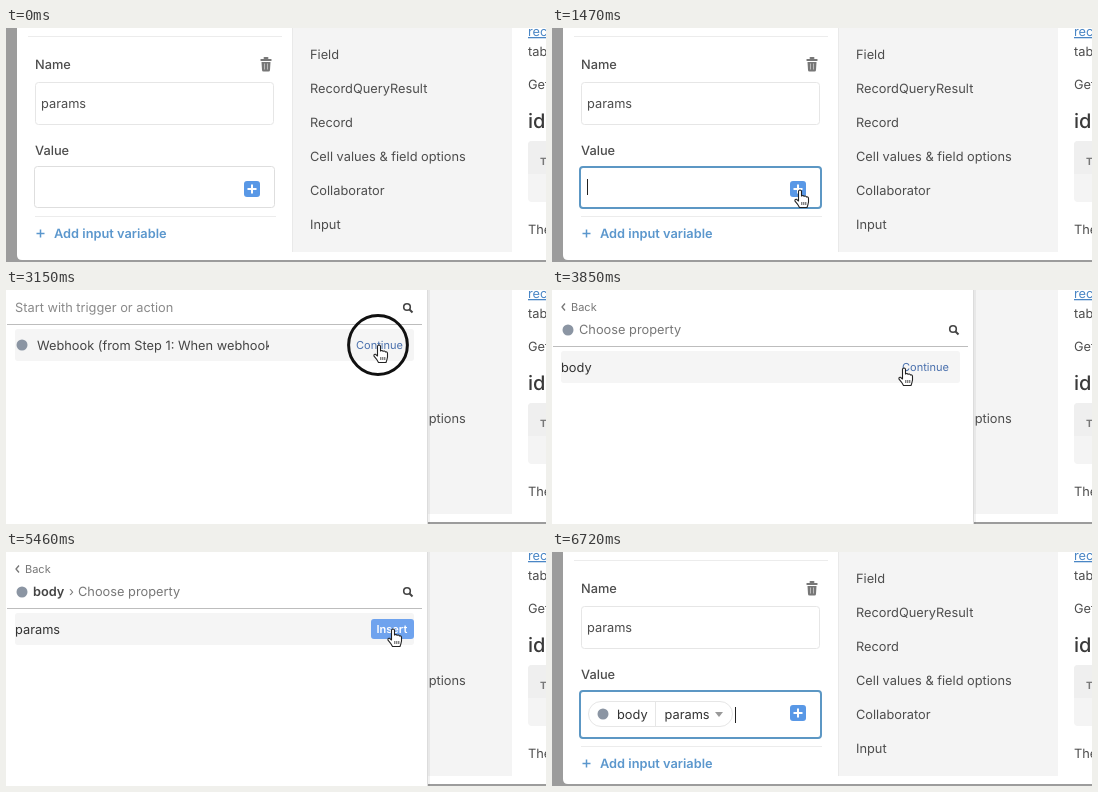
Recreate the animation shown at these times as an HTML page. Size 540 by 234 pixels, loop 6.86 s.

```html
<!DOCTYPE html>
<html lang="en">
<head>
<meta charset="utf-8">
<title>Insert a webhook value</title>
<style>
html, body { margin: 0; width: 100%; height: 100%; overflow: hidden; background: #fff; }
svg { display: block; width: 540px; height: 234px; font: 12.8px Inter, "Open Sans", sans-serif; }
svg svg { width: auto; height: auto; }
text { white-space: pre; text-rendering: geometricPrecision; }
</style>
</head>
<body>
<svg id="stage" viewBox="0 0 540 234"></svg>
<script>
const LOOP = 6860, STEP = 70;
const stage = document.getElementById('stage');

const rect = (x, y, w, h, fill, more = '') =>
  `<rect x="${x}" y="${y}" width="${w}" height="${h}" fill="${fill}" ${more}/>`;
const text = (x, y, s, fill = '#4d4d4d', more = '') =>
  `<text x="${x}" y="${y}" fill="${fill}" ${more}>${s}</text>`;
const path = (d, stroke, width = 1, fill = 'none') =>
  `<path d="${d}" stroke="${stroke}" stroke-width="${width}" fill="${fill}" stroke-linejoin="round"/>`;
const caret = (x, y) => rect(x, y, 1, 16, '#222');
const icon = (x, y) => `<circle cx="${x}" cy="${y}" r="5.5" fill="#8b95a3"/>`;
const MEDIUM = 'font-weight="500"', SEMI = 'font-weight="600"', SMALL = 'font-size="11"';
const between = (t, a, b) => t >= a && t < b;

// Dialog with the documentation column on the right
const menu = ['Field', 'RecordQueryResult', 'Record', 'Cell values &amp; field options', 'Collaborator', 'Input'];
const page = rect(0, 0, 540, 234, '#9c9c9c') +
  path('M11 -2V227Q11 232 16 232H542V-2Z', 'none', 0, '#fff') +
  rect(287, 0, 219, 224, '#f4f4f4') + rect(286, 0, 1, 224, '#e9e9e9') +
  menu.map((s, i) => text(304, 31 + 34 * i, s)).join('') +
  text(522, 8, 'record', '#4a86c5', 'text-decoration="underline"') +
  text(522, 28, 'table') + text(522, 61, 'Gets') +
  text(522, 100, 'id', '#3a3a3a', 'font-size="20" font-weight="500"') +
  rect(522, 113, 30, 61, '#f4f4f4', 'rx="4"') +
  path('M522 146V117Q522 113 526 113H540V146Z', 'none', 0, '#efefef') +
  text(534, 137, 'TYPE', '#777', 'font-size="10" font-weight="700"') +
  text(522, 206, 'The');

const trash = rect(254.5, 31, 11, 2, '#777', 'rx=".5"') + rect(257.5, 29, 5, 2, '#777', 'rx="1"') +
  path('M255.5 34H264.5L264 42Q264 43.5 262.5 43.5H257.5Q256 43.5 256 42Z', 'none', 0, '#777') +
  path('M258.5 35.5V41.5M261.5 35.5V41.5', '#ccc', .8);

function form(t) {
  const done = t >= 5670, focus = t >= 910, grow = done ? 6 : 0;
  let s = rect(22, 8, 254, 1, '#ececec') + text(29, 41, 'Name', '#4d4d4d', MEDIUM) + trash +
    rect(29.5, 54.5, 238, 42, '#fff', 'rx="3" stroke="#e6e6e6"') + text(35, 80, 'params') +
    text(29, 127, 'Value', '#4d4d4d', MEDIUM) +
    rect(29, 188 + grow, 241, 1, '#ececec') +
    (focus
      ? rect(28, 139, 241, 41 + grow, '#fff', 'rx="3" stroke="#5c97c4" stroke-width="2"')
      : rect(28.5, 138.5, 240, 41, '#fff', 'rx="3" stroke="#dedede"')) +
    rect(238, 153, 16, 16, '#5998e6', 'rx="3"') + path('M246 156.5V165.5M241.5 161H250.5', '#fff', 2) +
    path(`M34.5 ${201.5 + grow}V${209.5 + grow}M30.5 ${205.5 + grow}H38.5`, '#5b97cd', 1.5) +
    text(48, 210 + grow, 'Add input variable', '#5b97cd', SEMI);
  if (done) {
    s += rect(36.5, 149.5, 144, 25, '#fff', 'rx="12.5" stroke="#e6e6e6"') + icon(51, 162) +
      text(65, 167, 'body', '#333') + rect(103, 150, 1, 25, '#e6e6e6') + text(112.5, 167, 'params', '#333') +
      path('M163 160H171L167 165Z', 'none', 0, '#999');
    if (!between(t, 6160, 6720)) s += caret(183, 155);
  } else if (t >= 1470) s += caret(35, 151);
  return s;
}

const lens = y => `<circle cx="401" cy="${y - 1}" r="3.3" fill="none" stroke="#444" stroke-width="1.6"/>` +
  path(`M403.5 ${y + 1.5}L406.5 ${y + 4.5}`, '#444', 2);
const row = y => rect(9, y, 399, 32, '#f5f5f5', 'rx="3"');
const go = y => text(350, y, 'Continue', '#4a70ad', SMALL);

function picker(t) {
  let s = rect(421, 0, 3, 234, '#000', 'opacity=".05"') + rect(0, 0, 421, 234, '#fff') + rect(421, 0, 1, 234, '#dcdcdc');
  if (t < 3220) {
    const hover = t >= 2800;
    s += text(9, 22, 'Start with trigger or action', '#8a8a8a') + lens(18) + rect(1, 34, 415, 1, '#bdbdbd') +
      (hover ? row(39) : '') + icon(16, 55) +
      text(31, 60, 'Webhook (from Step 1: When webhook received)', '#444',
        hover ? 'style="clip-path: polygon(0 0, 263px 0, 263px 99px, 0 99px) view-box"' : '') +
      (hover ? go(59) : '');
    return s + (between(t, 1960, 2450) ? caret(394, 10) : '');
  }
  s += path('M13 13.5L10 17L13 20.5', '#777', 1.3) + text(19, 21, 'Back', '#777', SMALL) +
    icon(16, 40) + lens(40) + rect(1, 56, 415, 1, '#bdbdbd');
  if (t < 4620) {
    const hover = t >= 3640;
    s += text(27, 44, 'Choose property', '#777') + (hover ? row(61) : '') + text(9, 82, 'body', '#333') +
      (hover ? go(81) : '');
  } else {
    const hover = t >= 4690;
    s += text(27, 44, 'body', '#444', SEMI) + text(63, 44, '›', '#777') + text(72, 44, 'Choose property', '#777') +
      (hover ? row(61) : '') + text(9, 82, 'params', '#333') +
      (hover
        ? rect(365, 67, 43, 20, '#6fa3ee', 'rx="3"') + text(370.5, 81, 'Insert', '#fff', SMALL + ' ' + SEMI)
        : text(307, 81, '{"syncType":"test"}', '#999', SMALL));
  }
  const blink = between(t, 3220, 3710) || between(t, 4200, 5040);
  return s + (blink ? caret(394, 32) : '');
}

// Pointer stops: time, x, y
const stops = [[350, 249, 234], [700, 249, 167], [840, 249, 167], [1050, 248, 165], [1400, 248, 165],
  [1470, 248, 162], [1540, 247, 159], [2240, 247, 158], [2940, 373, 55], [3430, 373, 55], [3850, 352, 78],
  [3990, 352, 78], [4270, 384, 79], [4830, 384, 79], [4970, 374, 78], [5180, 387, 77], [6230, 387, 77],
  [6580, 262, 236]];
// Click rings: time, x, y
const clicks = [[1750, 247, 159], [3080, 372, 55], [4480, 384, 79], [5320, 386, 77]];

const arrow = path('M0 0V14L3.3 11L5.6 16.2L8 15.2L5.7 10.2H10Z', '#fff', 1, '#000');
const hand = path('M-1.5 1Q0 -1 1.5 1V6Q3 4.8 4 6.3Q5.6 5.3 6.5 7Q8.5 6.5 8.5 8.5V12Q8 15 7 17.5H-.5' +
  'Q-2 14.5 -5 11.2Q-5.5 8.8 -3.4 9.3L-1.5 11Z', '#222', 1.1, '#fff') +
  path('M1.8 12V15M3.8 12V15M5.8 12V15', '#222', .8);

function pointer(t) {
  const i = stops.findIndex(p => p[0] > t);
  if (i < 1) return '';
  const [a, x, y] = stops[i - 1], [b, x2, y2] = stops[i];
  const k = (t - a) / (b - a), e = k * k * (3 - 2 * k);
  const isArrow = t < 700 || between(t, 1890, 2800) || t >= 5670;
  return `<g transform="translate(${x + (x2 - x) * e} ${y + (y2 - y) * e})">${isArrow ? arrow : hand}</g>`;
}

function ring(t) {
  const c = clicks.find(c => between(t, c[0], c[0] + 140));
  return c ? `<circle cx="${c[1]}" cy="${c[2]}" r="29.4" fill="none" stroke="#111" stroke-width="3"/>` : '';
}

const start = performance.now();
let last = -1;
function draw() {
  const t = Math.floor((performance.now() - start) % LOOP / STEP) * STEP;
  if (t !== last) {
    last = t;
    stage.innerHTML = page + (between(t, 1890, 5670) ? picker(t) : form(t)) + ring(t) + pointer(t);
  }
  requestAnimationFrame(draw);
}
draw();
</script>
</body>
</html>
```
